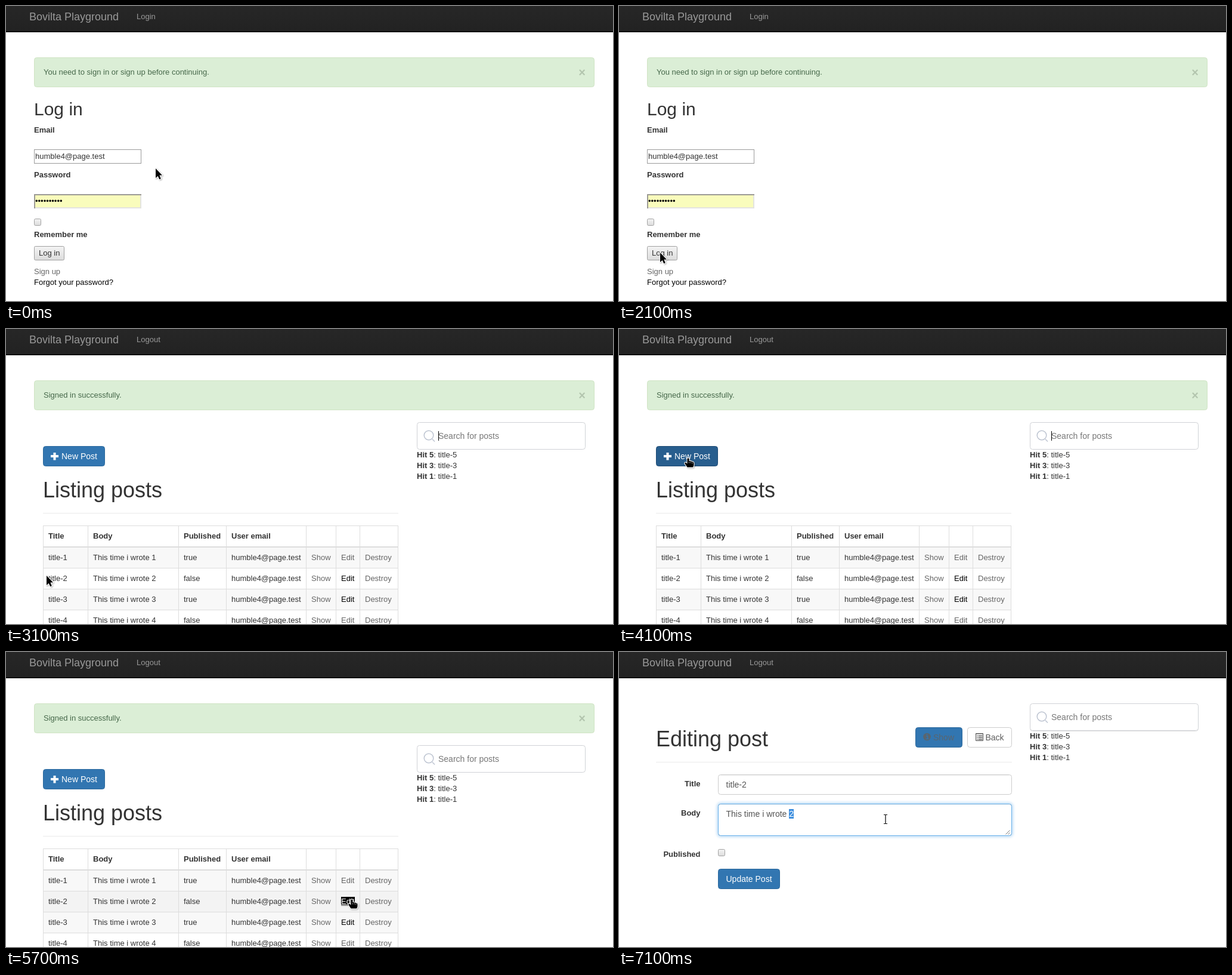
Recreate the animation shown at these times as an HTML page. Size 1018 by 494 pixels, loop 8 s.

```html
<!DOCTYPE html>
<html lang="en">
<head>
<meta charset="utf-8">
<title>Posts playground</title>
<style>
  html, body { margin: 0; width: 100%; height: 100%; overflow: hidden; background: #fff; }
  svg { display: block; width: 100%; height: 100%; font: 13px "Liberation Sans", Arial, sans-serif; }
  text { fill: #333; white-space: pre; }
  .b { font-weight: bold; }
  .m { font-size: 14px; }
  .link { fill: #666; }
  .field { fill: #fff; stroke: #ccc; }
</style>
</head>
<body>
<svg id="stage" viewBox="0 0 1018 494" xmlns="http://www.w3.org/2000/svg"></svg>
<script>
const LOOP = 8000, STEP = 100;
const EMAIL = 'humble4@page.test';
const stage = document.getElementById('stage');

// Markup helpers
const text = (x, y, s, attrs = '') => `<text x="${x}" y="${y}" ${attrs}>${s}</text>`;
const rect = (x, y, w, h, attrs = '') => `<rect x="${x}" y="${y}" width="${w}" height="${h}" ${attrs}/>`;
const path = (d, attrs = '') => `<path d="${d}" ${attrs}/>`;
const group = (id, body, attrs = '') => `<g id="${id}" ${attrs}>${body}</g>`;
const box = (x, y, w, h, r, attrs) => rect(x + .5, y + .5, w - 1, h - 1, `rx="${r}" ${attrs}`);
const button = (x, y, w, attrs = 'fill="#3276b1" stroke="#2c699d"') => box(x, y, w, 34, 4, attrs);
const checkbox = (x, y) => box(x, y, 12, 12, 2, 'fill="url(#grey)" stroke="#a2a2a2"');

// Sunken two-pixel border of a plain input
const sunken = (x, y, w, h, fill) =>
  rect(x, y, w, h, `fill="${fill}"`) +
  path(`M${x + 1} ${y + h}V${y + 1}H${x + w}`, 'fill="none" stroke="#9c9a94" stroke-width="2"') +
  path(`M${x + 2} ${y + h - 1}H${x + w - 1}V${y + 2}`, 'fill="none" stroke="#e4e4e0" stroke-width="2"');

const navbar = () =>
  rect(0, 0, 1018, 43, 'fill="url(#bar)"') + rect(0, 42, 1018, 2, 'fill="#0c0c0c"') +
  text(39, 24, 'Bovilta Playground', 'font-size="18" style="fill:#999"') +
  text(219, 22, 'Login', 'id="session" style="fill:#999"');

const alertBox = () =>
  box(47, 86, 940, 50, 4, 'fill="#dbeed6" stroke="#cfe4c4"') +
  text(63, 115, '', 'id="notice" style="fill:#46684a"') +
  text(966, 118, '×', 'font-size="20" class="b" text-anchor="middle" style="fill:#b3c5ae"');

const login = () =>
  text(47, 183, 'Log in', 'font-size="30"') +
  text(47, 212, 'Email', 'class="b"') +
  box(47, 240, 180, 24, 0, 'fill="#fff" stroke="#9b9b9b"') +
  group('blurred', sunken(47, 240, 180, 24, '#fff')) +
  text(49, 256, EMAIL) +
  text(47, 287, 'Password', 'class="b"') +
  sunken(47, 315, 180, 24, '#f9fcbc') +
  text(49, 331, '•'.repeat(10), 'style="fill:#000"') +
  checkbox(47, 356) +
  text(47, 387, 'Remember me', 'class="b"') +
  box(47, 402, 51, 24, 2, 'id="submit" fill="url(#grey)" stroke="#a0a0a0"') +
  text(55, 418, 'Log in') +
  text(47, 449, 'Sign up', 'class="link"') +
  text(47, 467, 'Forgot your password?', 'style="fill:#000"');

const rowTop = i => 366 + i * 35 - (i > 0 ? 0 : 0);

function table() {
  const cols = [62, 137, 289, 369, 503, 553, 593, 657];
  const cell = (c, y, s, attrs) => text(cols[c] + 9 - (c === 0 ? 0 : 0), y, s, attrs);
  let out = '';
  for (let i = 0; i < 4; i++)
    out += rect(62, rowTop(i), 596, 35, `id="row${i}"`);
  ['Title', 'Body', 'Published', 'User email'].forEach((s, c) => out += cell(c, 351, s, 'class="b"'));
  for (let i = 0; i < 4; i++) {
    const y = 387 + i * 35;
    [`title-${i + 1}`, `This time i wrote ${i + 1}`, i % 2 ? 'false' : 'true', EMAIL]
      .forEach((s, c) => out += cell(c, y, s));
    out += cell(4, y, 'Show', 'class="link"') + cell(6, y, 'Destroy', 'class="link"') +
      cell(5, y, 'Edit', i === 1 || i === 2 ? 'style="fill:#000"' : 'class="link"');
  }
  const lines = cols.map(x => `M${x + .5} 329V494`).join('') +
    [329, 400, 435, 470].map(y => `M62 ${y + .5}H658`).join('');
  return out + path(lines, 'stroke="#ddd" fill="none"') + rect(62, 364, 596, 2, 'fill="#ddd"') +
    group('editHover', rect(562, 410, 23, 15, 'fill="#000"') +
      text(562, 422, 'Edit', 'style="fill:#fff" text-decoration="underline"'));
}

const list = () =>
  button(62, 196, 104, 'id="newPost"') +
  path('M79.5 207h4v4h4.5v4h-4.5v4.5h-4v-4.500h-4.500v-4h4.500z', 'fill="#fff"') +
  text(93, 218, 'New Post', 'class="m" style="fill:#fff"') +
  text(62, 282, 'Listing posts', 'font-size="36"') +
  rect(62, 308, 596, 1, 'fill="#eaeaea"') + table();

const listIcon = () =>
  path('M598.5 136.500h12v12h-12zM598 137h13', 'fill="none" stroke="#555"') +
  path('M600 140.500h1.500m1 0h7M600 143.500h1.500m1 0h7M600 146.500h1.500m1 0h7', 'stroke="#555" stroke-width="1.300"');

const edit = () =>
  text(62, 158, 'Editing post', 'font-size="36"') +
  button(497, 126, 79) +
  '<circle cx="516.5" cy="142" r="6.300" fill="#5a656e"/>' +
  path('M515 141h2.500v4.500m-3 0h5M515.500 138.500h2', 'fill="none" stroke="#3276b1" stroke-width="1.500"') +
  text(527, 148, 'Show', 'class="m" style="fill:#5a656e"') +
  button(584, 126, 75, 'class="field"') + listIcon() +
  text(614.5, 148, 'Back', 'class="m" style="fill:#5c5c5c"') +
  rect(62, 184, 597, 1, 'fill="#eaeaea"') +
  [['Title', 225], ['Body', 274], ['Published', 343]]
    .map(([s, y]) => text(136.5, y, s, 'class="b" text-anchor="end"')).join('') +
  box(166, 205, 493, 34, 4, 'class="field"') +
  path('M169 206.500H656', 'stroke="#eee"') +
  text(179.5, 227, 'title-2', 'class="m" style="fill:#555"') +
  box(166, 254, 493, 54, 4, 'id="glow" fill="none" stroke="#66afe9" stroke-width="3" filter="url(#blur)"') +
  box(166, 254, 493, 54, 4, 'class="field"') +
  path('M169 255.500H656', 'stroke="#eee"') +
  box(166, 254, 493, 54, 4, 'id="ring" fill="none" stroke="#66afe9"') +
  text(179.5, 276, 'This time i wrote 2', 'class="m" style="fill:#555"') +
  group('picked', rect(285, 263, 8, 16, 'fill="#3c8ede"') +
    text(285.2, 276, '2', 'class="m" style="fill:#fff"')) +
  rect(293, 263, 1, 16, 'id="bodyCaret" fill="#222"') +
  path('M648.500 305.500l7-7M652.500 305.500l3-3', 'stroke="#777"') +
  checkbox(166, 330) +
  button(166, 363, 104) +
  text(179.5, 385, 'Update Post', 'class="m" style="fill:#fff"');

const search = () =>
  box(689, 157, 283, 46, 4, 'id="searchShadow" fill="none" stroke="#e2e2e2"') +
  box(689, 156, 283, 46, 4, 'id="searchBox" fill="#fff" stroke="#d0d2d6"') +
  path('M715 184.500l4 4', 'stroke="#bcc3d0" stroke-width="1.500"') +
  '<circle cx="709" cy="178" r="7.800" fill="none" stroke="#bcc3d0" stroke-width="1.500"/>' +
  text(725, 184, 'Search for posts', 'class="m" style="fill:#777"') +
  rect(725, 171, 1, 16, 'id="caret" fill="#000"') +
  group('hits', [5, 3, 1].map((n, i) =>
    text(689, 215 + i * 18, `<tspan class="b">Hit ${n}</tspan>: title-${n}`)).join(''));

const outlined = 'fill="#000" stroke="#fff" stroke-linejoin="round" paint-order="stroke" stroke-width="2"';
const pointers = () =>
  group('arrow', path('M0 0V16L3.700 12.700 6.200 18.300 8.800 17.200 6.400 11.600H11Z', outlined), 'filter="url(#drop)"') +
  group('hand', path('M-1.500 1Q0-.5 1.500 1V5.500Q3 4 4.300 5.700 6 5 7 6.700 9.500 6 9.500 9V12Q9 14 8 15.500H-1.500L-5.500 9.500Q-6 7-3.800 7.700L-1.500 9.500Z', outlined) +
    path('M1.500 6.500v2M4.300 6.500v2M7 7.500v2', 'stroke="#fff" stroke-width=".7"'), 'filter="url(#drop)"') +
  group('beam', path('M-3-7.500H-.8L0-7 .8-7.500H3M-3 7.500H-.8L0 7 .8 7.500H3M0-7V7', 'fill="none" stroke="#fff" stroke-width="3"') +
    path('M-3-7.500H-.8L0-7 .8-7.500H3M-3 7.500H-.8L0 7 .8 7.500H3M0-7V7', 'fill="none" stroke="#000" stroke-width="1.200"'));

stage.innerHTML = `<defs>
  <linearGradient id="grey" x2="0" y2="1"><stop stop-color="#f4f4f4"/><stop offset="1" stop-color="#dcdcdc"/></linearGradient>
  <linearGradient id="bar" x2="0" y2="1"><stop stop-color="#272727"/><stop offset="1" stop-color="#222"/></linearGradient>
  <filter id="blur" x="-10%" y="-40%" width="120%" height="180%"><feGaussianBlur stdDeviation="2.5"/></filter>
  <filter id="drop" x="-50%" y="-50%" width="200%" height="200%"><feDropShadow dx="1" dy="1" stdDeviation=".8" flood-opacity=".35"/></filter>
</defs>` + rect(0, 0, 1018, 494, 'fill="#fff"') + navbar() + group('alert', alertBox()) +
  group('login', login()) + group('list', list()) + group('edit', edit()) +
  group('search', search()) + group('pointer', pointers());

const el = {};
stage.querySelectorAll('[id]').forEach(n => el[n.id] = n);
const show = (id, on) => el[id].setAttribute('display', on ? 'inline' : 'none');
const set = (id, name, value) => el[id].setAttribute(name, value);

// Mouse path: time, x, y
const route = [
  [100, 251, 272], [400, 38, 351], [500, 38, 351], [700, 68, 401], [800, 68, 401],
  [900, 69, 392], [1200, 69, 413], [3100, 68, 413], [3600, 84, 318], [3900, 106, 228],
  [4100, 116, 216], [4500, 116, 216], [4700, 200, 290], [5000, 500, 473], [5100, 545, 450],
  [5300, 566, 436], [5500, 580, 414], [6000, 580, 414], [6100, 567, 415], [6700, 447, 280]
];

function mouseAt(t) {
  const i = route.findIndex(k => k[0] >= t);
  if (i < 0) return route[route.length - 1].slice(1);
  if (i === 0) return route[0].slice(1);
  const [t0, x0, y0] = route[i - 1], [t1, x1, y1] = route[i];
  const p = (t - t0) / (t1 - t0);
  return [Math.round(x0 + (x1 - x0) * p), Math.round(y0 + (y1 - y0) * p)];
}

const within = (t, a, b) => t >= a && t < b;

function render(now) {
  const t = Math.floor(now % LOOP / STEP) * STEP;
  const page = t < 2600 ? 'login' : t < 6100 ? 'list' : 'edit';
  const [x, y] = mouseAt(t);
  const over = (bx, by, w, h) => within(x, bx, bx + w) && within(y, by, by + h);

  ['login', 'list', 'edit'].forEach(id => show(id, id === page));
  show('alert', page !== 'edit');
  el.session.textContent = page === 'login' ? 'Login' : 'Logout';
  el.notice.textContent = page === 'login' ? 'You need to sign in or sign up before continuing.' : 'Signed in successfully.';

  const pressed = within(t, 2000, 2100);
  show('blurred', pressed);
  set('submit', 'fill', pressed ? '#d4d4d4' : 'url(#grey)');

  const onNew = page === 'list' && over(62, 196, 104, 34);
  const onEdit = page === 'list' && over(562, 410, 23, 15);
  set('newPost', 'fill', onNew ? '#285e8e' : '#3276b1');
  set('newPost', 'stroke', onNew ? '#1f4b73' : '#2c699d');
  show('editHover', onEdit);
  for (let i = 0; i < 4; i++) {
    const hover = t > 3100 && over(62, rowTop(i), 596, 35);
    set('row' + i, 'fill', hover ? '#f3f3f3' : i % 2 ? '#fff' : '#f8f8f8');
  }

  show('search', t >= 2800);
  set('search', 'transform', `translate(0 ${page === 'edit' ? -70 : 0})`);
  show('searchShadow', page === 'edit');
  show('hits', within(t, 2900, 6100) || t >= 6400);
  show('caret', [[3100, 3600], [4100, 4600], [5300, 5700], [6100, 6600]].some(([a, b]) => within(t, a, b)));

  const focus = Math.min(1, Math.max(0, (t - 6700) / 200));
  set('glow', 'opacity', focus * .7);
  set('ring', 'opacity', focus);
  show('bodyCaret', within(t, 6800, 7100));
  show('picked', t >= 7100);

  const onText = page === 'login' ? over(47, 240, 180, 24) || over(47, 315, 180, 24)
    : page === 'list' ? over(62, 250, 200, 40)
    : over(166, 205, 493, 34) || over(166, 254, 493, 54);
  const kind = onNew || onEdit ? 'hand' : onText ? 'beam' : 'arrow';
  ['arrow', 'hand', 'beam'].forEach(id => show(id, id === kind));
  set('pointer', 'transform', `translate(${x} ${y})`);
}

const start = performance.now();
function tick() {
  render(performance.now() - start);
  requestAnimationFrame(tick);
}
render(0);
tick();
</script>
</body>
</html>
```
